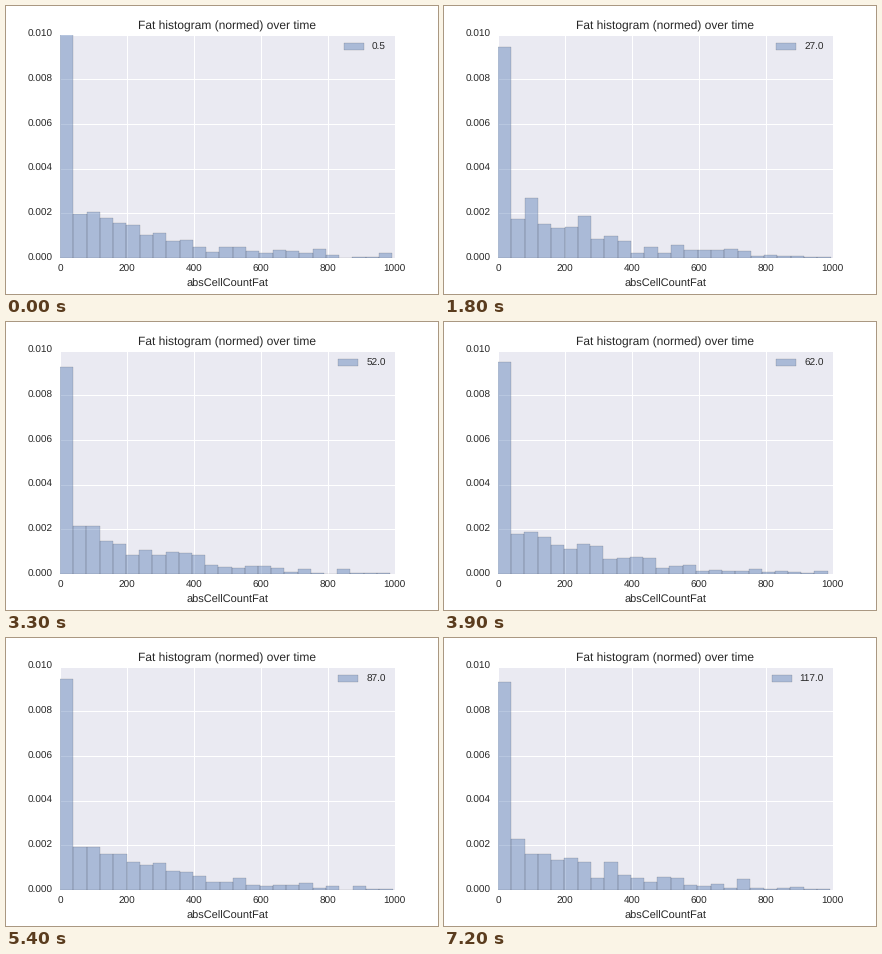
A matplotlib script for the animation above (7500 ms loop, 432 by 288 pixels).

```python
import matplotlib.pyplot as plt
import numpy as np
from matplotlib.animation import FuncAnimation

FRAMES, INTERVAL, BINS = 25, 300, 25
UNIT = 4.5e-5  # density of a single count

plt.rcParams.update({
    "font.family": "Liberation Sans",
    "text.hinting": "no_hinting",
    "text.color": "#262626",
    "axes.labelcolor": "#262626",
    "xtick.color": "#262626",
    "ytick.color": "#262626",
})


def histogram(step):
    """Bin width and densities: a tall first bin, then a noisy decaying tail."""
    rng = np.random.default_rng(100 + step)
    width = rng.uniform(984, 994) / BINS
    first = rng.normal(0.0094, 0.00015) + 0.00115 * np.exp(-step / 1.5)
    k = np.arange(1, BINS)
    tail = 0.00245 * np.exp(-0.12 * k - 0.0015 * k**2)
    counts = rng.poisson(tail / UNIT)
    counts[-1] = max(counts[-1], 1)  # the largest sample falls in the last bin
    return width, np.append(first, counts * UNIT)


def label(step):
    return f"{5 * step - 3 if step else 0.5:.1f}"


fig = plt.figure(figsize=(6, 4), dpi=72, facecolor="white")
ax = fig.add_axes([0.125, 0.125, 0.775, 0.775], facecolor="#EAEAF2")
ax.set(xlim=(0, 1000), ylim=(0, 0.01))
ax.set_xticks(range(0, 1001, 200))
ax.set_yticks(np.linspace(0, 0.01, 6))
ax.yaxis.set_major_formatter("{x:.3f}")
ax.tick_params(length=0, pad=7, labelsize=10)
plt.setp(ax.get_yticklabels(), va="center")
ax.set_axisbelow(True)
ax.grid(color="white", lw=1, ls="-")
for spine in ax.spines.values():
    spine.set_visible(False)
ax.set_title("Fat histogram (normed) over time", fontsize=12, pad=5)
fig.text(0.5125, 7 / 288, "absCellCountFat", fontsize=11, ha="center", va="baseline")

bars = ax.bar(np.zeros(BINS), np.zeros(BINS), align="edge", color="#4C72B0",
              edgecolor="black", linewidth=0.3, alpha=0.4)


def draw(step):
    width, heights = histogram(step)
    for i, (bar, height) in enumerate(zip(bars, heights)):
        bar.set_bounds(i * width, 0, width, height)
    ax.legend([bars[0]], [label(step)], loc="upper right", fontsize=10,
              frameon=False, bbox_to_anchor=(1, 1 + 1 / 223.2))
    return bars


anim = FuncAnimation(fig, draw, frames=FRAMES, init_func=lambda: draw(0),
                     interval=INTERVAL, repeat=True, repeat_delay=0)
plt.show()
```
